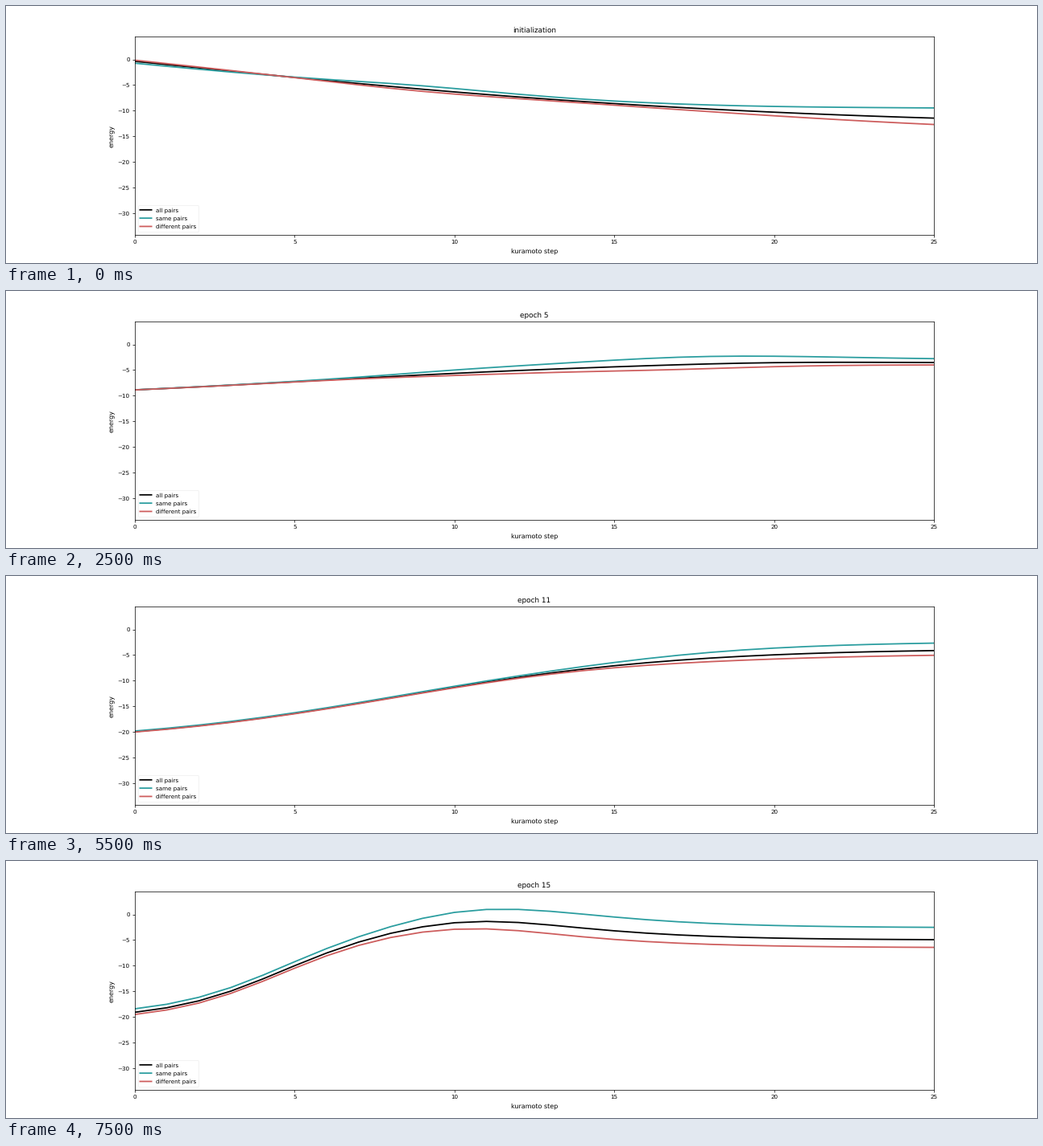
Recreate the animation shown at these times as a matplotlib script. Size 1280 px wide and 320 px high, loop 8000 ms.

```python
import numpy as np
import matplotlib.pyplot as plt
from matplotlib.animation import FuncAnimation

plt.rcParams["font.family"] = "DejaVu Sans"
plt.rcParams["text.hinting"] = "none"

EPOCHS = 16
SAME_SHARE = 0.385  # fraction of all pairs that are "same" pairs
STEPS = np.arange(26)


def wave(low, high, mid, width, bump=0, peak=0, spread=1):
    """Logistic move from low to high, plus a sech-shaped bump or dip."""
    rise = 1 / (1 + np.exp(-(STEPS - mid) / width))
    return low + (high - low) * rise + bump / np.cosh((STEPS - peak) / spread)


def curves(mean, gap):
    """All, same and different pairs from the mean and the same-different gap."""
    return np.array([mean, mean + (1 - SAME_SHARE) * gap, mean - SAME_SHARE * gap])


# Training drifts smoothly between these stages.
STAGES = {
    0: curves(wave(12, -13.5, 0.6, 10),
              wave(-0.8, 4.8, 20.8, 4.5, 1.5, 9, 3)),
    5: curves(wave(-11, -3.6, 5, 5.5, 0.5, 20, 4),
              wave(0, 0.9, 8.5, 1.2, 1.5, 17.3, 3.5)),
    7: curves(wave(-15.2, -5.5, 18.75, 4.1, -3.1, 8, 3.5),
              wave(-0.35, 0.75, 18.5, 2.2, -0.85, 8.5, 3)),
    11: curves(wave(-22.5, -3.7, 8.25, 4.45),
               wave(0.2, 2.4, 16, 2)),
    13: curves(wave(-21.5, -7.25, 4.4, 2.5, 0.9, 11, 2.3),
               wave(1.1, 3.7, 9.5, 2)),
    15: curves(wave(-20.5, -5, 4.37, 1.71, 4, 10.55, 3.15),
               wave(1.1, 3.9, 9, 1.3, 0.6, 13.5, 2.5)),
}

# One epoch jumps far below its neighbours.
PLUNGE_EPOCH = 3
PLUNGE = curves(wave(-27.3, -15.1, 13.3, 4.2, -5.4, 5.4, 3.8),
                wave(-0.75, -0.7, 12, 4, -1.9, 9.5, 4.5))


def energies(epoch):
    if epoch == PLUNGE_EPOCH:
        return PLUNGE
    before = max(s for s in STAGES if s <= epoch)
    after = min(s for s in STAGES if s >= epoch)
    part = (epoch - before) / max(after - before, 1)
    return STAGES[before] * (1 - part) + STAGES[after] * part


fig, ax = plt.subplots(figsize=(20, 5), dpi=64)
lines = [
    ax.plot([], [], color=color, lw=2, label=f"{name} pairs")[0]
    for name, color in (("all", "black"), ("same", "#2a9d9f"), ("different", "#cd5c5c"))
]
ax.set_xlim(0, 25)
ax.set_ylim(-34.23, 4.42)
ax.set_xticks(range(0, 26, 5))
ax.set_yticks(range(-30, 1, 5))
ax.tick_params(labelsize=8)
ax.set_xlabel("kuramoto step", fontsize=9)
ax.set_ylabel("energy", fontsize=9)
title = ax.set_title("initialization", fontsize=10)
legend = ax.legend(loc="lower left", fontsize=8, framealpha=0.8, edgecolor="0.93")
plt.setp(legend.get_lines(), snap=False)


def update(epoch):
    for line, energy in zip(lines, energies(epoch)):
        line.set_data(STEPS, energy)
    title.set_text(f"epoch {epoch}" if epoch else "initialization")
    return [*lines, title]


anim = FuncAnimation(fig, update, frames=EPOCHS, interval=500,
                     repeat=True, repeat_delay=0, blit=False)
plt.show()
```
